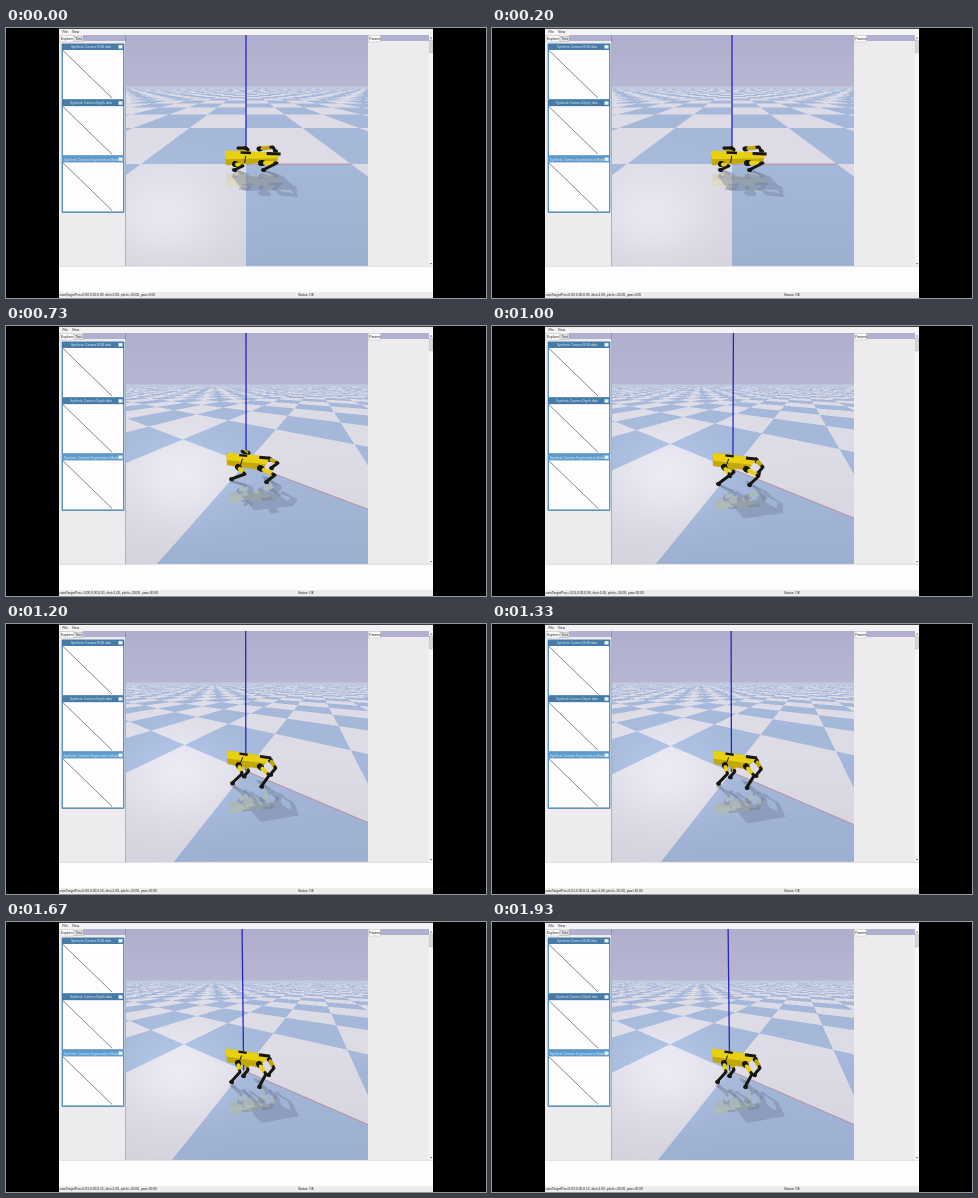
Animation, 480 px wide and 270 px high, one loop 2.07 s. Source, as an HTML page with a canvas:

```html
<!DOCTYPE html>
<html lang="en">
<head>
<meta charset="utf-8">
<title>Walking robot simulation</title>
<style>
html, body { margin: 0; width: 100%; height: 100%; overflow: hidden; background: #000; }
canvas, svg { position: absolute; left: 0; top: 0; width: 480px; height: 270px; display: block; }
text { font-family: "Liberation Sans", Arial, sans-serif; font-size: 3.3px; fill: #222; white-space: pre; }
.title { font-size: 3.2px; fill: #dce9f2; text-anchor: middle; }
</style>
</head>
<body>
<canvas id="view" width="480" height="270"></canvas>
<svg viewBox="0 0 480 270">
  <rect x="53" width="374" height="7" fill="#f3f2f5"/>
  <rect x="53" width="374" height="1" fill="#3c3c3c"/>
  <text x="56.5" y="5">File</text>
  <text x="66" y="5">View</text>

  <rect x="53" y="7" width="66.5" height="231" fill="#edebee"/>
  <rect x="77" y="7" width="42.5" height="6" fill="#b1b0cf"/>
  <rect x="54" y="7.5" width="14" height="6.5" fill="#fafafa" stroke="#bbb" stroke-width=".5"/>
  <rect x="68" y="8.2" width="9" height="5.3" fill="#e4e4e4" stroke="#aaa" stroke-width=".5"/>
  <text x="55" y="12">Explorer</text>
  <text x="69.5" y="12.2">Test</text>
  <path d="M119.5 13V238" stroke="#c0bfc8" stroke-width=".8"/>
  <g id="panes"></g>

  <rect x="362" y="7" width="65" height="231" fill="#eeebee"/>
  <rect x="374" y="7" width="49" height="6" fill="#b1b0cf"/>
  <rect x="362.5" y="7.5" width="12" height="6.5" fill="#fafafa" stroke="#bbb" stroke-width=".5"/>
  <text x="363.2" y="12">Params</text>
  <rect x="423" y="7" width="4" height="231" fill="#f6f6f6"/>
  <rect x="423.4" y="12" width="3.2" height="13" fill="#d6d6d6" stroke="#aaa" stroke-width=".4"/>
  <path d="M424 10.5L425 9L426 10.5ZM424 235L425 236.5L426 235Z" fill="#555"/>

  <rect x="53" y="238" width="374" height="26" fill="#fefcfe"/>
  <path d="M53 238.3H427" stroke="#c8c8c8" stroke-width=".6"/>
  <rect x="53" y="264" width="374" height="6" fill="#ececec"/>
  <text id="camera" x="53.6" y="268.4"></text>
  <text x="292" y="268.4">Status: OK</text>
</svg>
<script>
const LOOP = 2070, STEP = 66.77, START = 530;
const VIEW = { x: 120, y: 7, w: 242, h: 231 };
const CX = 240, CY = 136, DIST = 1;
const FX = 105, FY = 135; // the viewport is squeezed sideways
const SP = Math.sin(Math.PI / 6), CP = Math.cos(Math.PI / 6);
const ctx = document.getElementById('view').getContext('2d');

const makeLayer = (w, h) => {
  const c = document.createElement('canvas');
  c.width = w; c.height = h;
  return c;
};
const floorLayer = makeLayer(VIEW.w, VIEW.h);
const floorCtx = floorLayer.getContext('2d');
const ghostLayer = makeLayer(480, 270);
const ghostCtx = ghostLayer.getContext('2d');
const image = floorCtx.createImageData(VIEW.w, VIEW.h);

// Body: four corners. Then hip, knee and foot of far left, far right, near left, near right.
const resting = [
  220,124, 272,126, 270,133, 221,136,
  241,122, 232,120, 239,120,  253,121, 267,119, 269,123,
  229,136, 237,138, 228,142,  255,135, 271,135, 257,142];
const crouch = [
  221,123, 261,128, 259,138, 221,132,
  247,122, 235,119, 240,122,  259,125, 275,126, 268,130,
  225,133, 239,134, 224,138,  247,138, 261,139, 248,146];
const rise = [
  222,128, 262,132, 256,143, 222,138,
  242,127, 236,125, 244,131,  263,133, 272,137, 265,142,
  232,141, 239,148, 225,153,  254,142, 269,149, 260,156];
const lift = [
  222,128, 263,133, 255,143, 222,139,
  238,140, 242,146, 237,150,  264,134, 271,141, 266,147,
  232,141, 238,149, 226,158,  254,143, 267,150, 257,159];
const stand = [
  222,128, 263,134, 253,144, 223,139,
  240,140, 243,148, 238,154,  264,137, 269,146, 263,153,
  233,141, 235,150, 226,160,  254,142, 261,152, 254,165];
const shifted = stand.map((v, i) => i % 2 ? v : v - 1);

const keys = [
  { t: 530,  yaw: 23, h: 0,    dx: 0,     ground: 146, pose: crouch },
  { t: 730,  yaw: 30, h: .01,  dx: 0,     ground: 154, pose: rise },
  { t: 1000, yaw: 30, h: .06,  dx: -.01,  ground: 158, pose: lift },
  { t: 1330, yaw: 30, h: .122, dx: .01,   ground: 162, pose: stand },
  { t: 1670, yaw: 30, h: .122, dx: .028,  ground: 162, pose: shifted },
  { t: 1930, yaw: 30, h: .122, dx: .028,  ground: 162, pose: shifted }
];
const rest = { yaw: 0, h: 0, dx: 0, ground: 142, pose: resting };

const mix = (a, b, k) => a + (b - a) * k;
const clamp = v => Math.max(0, Math.min(1, v));

function stateAt(t) {
  if (t < START) return rest;
  let i = 0;
  while (i < keys.length - 2 && t >= keys[i + 1].t) i++;
  const a = keys[i], b = keys[i + 1], k = clamp((t - a.t) / (b.t - a.t));
  const s = { pose: a.pose.map((v, n) => mix(v, b.pose[n], k)) };
  for (const name of ['yaw', 'h', 'dx', 'ground']) s[name] = mix(a[name], b[name], k);
  return s;
}

function drawFloor(s) {
  const a = s.yaw * Math.PI / 180, sin = Math.sin(a), cos = Math.cos(a);
  const glowX = s.yaw ? 174 : 158, glowY = s.yaw ? 152 : 190;
  const data = image.data;
  let p = 0;
  for (let j = 0; j < VIEW.h; j++) for (let i = 0; i < VIEW.w; i++, p += 4) {
    const px = VIEW.x + i, py = VIEW.y + j;
    let white = 0, ground = 0, far = 0;
    for (let n = 0; n < 4; n++) {
      const u = (px + .25 + (n & 1) / 2 - CX) / FX;
      const v = (CY - py - .25 - (n >> 1) / 2) / FY;
      const down = SP - v * CP;
      if (down < .002) continue;
      const reach = (DIST * SP + s.h) / down;
      const fwd = reach * (CP + v * SP) - DIST * CP, right = reach * u;
      const x = right * cos - fwd * sin + s.dx, y = right * sin + fwd * cos;
      const even = (Math.floor(x) + Math.floor(y)) % 2 === 0;
      const fade = clamp((reach - 9) / 40);
      ground++;
      far += fade;
      white += mix(even ? 1 : 0, .5, fade);
    }
    const k = clamp((py - 7) / 52);
    const sky = [mix(176, 183, k), mix(174, 182, k), mix(206, 210, k)];
    const g = ground / 4, w = ground ? white / ground : 0, f = ground ? far / ground : 0;
    const r2 = ((px - glowX) / 55) ** 2 + ((py - glowY) / 45) ** 2;
    const shine = 16 * Math.exp(-r2) - 8 * clamp((py - 130) / 100);
    const tile = [mix(165, 220, w), mix(184, 219, w), mix(217, 230, w)];
    for (let c = 0; c < 3; c++)
      data[p + c] = mix(sky[c], mix(tile[c] + shine, tile[c], f), g);
    data[p + 3] = 255;
  }
  floorCtx.putImageData(image, 0, 0);
  ctx.drawImage(floorLayer, VIEW.x, VIEW.y);
}

function project(s, x, z) {
  const a = s.yaw * Math.PI / 180, wx = x - s.dx, wz = z - s.h;
  const fwd = -wx * Math.sin(a), depth = DIST + fwd * CP - wz * SP;
  return [CX + FX * wx * Math.cos(a) / depth, CY - FY * (fwd * SP + wz * CP) / depth];
}

function line(c, points, color, width) {
  c.beginPath();
  points.forEach(q => c.lineTo(q[0], q[1]));
  c.strokeStyle = color;
  c.lineWidth = width;
  c.stroke();
}

function fillShape(c, points, color) {
  c.beginPath();
  points.forEach(q => c.lineTo(q[0], q[1]));
  c.closePath();
  c.fillStyle = c.strokeStyle = color;
  c.lineWidth = 2.4;
  c.fill();
  c.stroke();
}

const between = (a, b, k) => [mix(a[0], b[0], k), mix(a[1], b[1], k)];

function drawLeg(c, [hip, knee, foot], tone, near) {
  line(c, [hip, between(hip, knee, .1)], tone.dark, near ? 6 : 5);
  line(c, [between(hip, knee, .25), between(hip, knee, .8)], near ? tone.light : tone.side, 4);
  line(c, [between(hip, knee, .85), knee, foot], tone.dark, 3);
  line(c, [foot, [foot[0] + 1.2, foot[1] + .3]], tone.dark, 3.6);
}

function drawRobot(c, pose, tone) {
  const q = [];
  for (let i = 0; i < pose.length; i += 2) q.push([pose[i], pose[i + 1]]);
  const [a, b, d, e] = q;
  const leg = n => q.slice(4 + n * 3, 7 + n * 3);
  c.lineJoin = c.lineCap = 'round';
  drawLeg(c, leg(0), tone, false);
  drawLeg(c, leg(1), tone, false);
  fillShape(c, [a, b, d, e], tone.side);
  fillShape(c, [a, b, between(b, d, .45), between(a, e, .5)], tone.light);
  c.lineCap = 'butt';
  line(c, [between(between(a, b, .38), between(e, d, .38), .3), between(e, d, .36)], tone.dark, 1);
  line(c, [between(a, b, .28), between(a, b, .48)], tone.dark, 2.4);
  line(c, [between(a, b, .78), between(a, b, 1.05)], tone.dark, 3);
  c.lineCap = 'round';
  drawLeg(c, leg(2), tone, true);
  drawLeg(c, leg(3), tone, true);
}

const paint = { light: '#e8d012', side: '#c2a808', dark: '#17170f' };
const shade = { light: '#6e7a98', side: '#6e7a98', dark: '#6e7a98' };

// Flips the robot about the ground line, leaning and scaled, as a faint layer.
function drawGhost(s, tone, lean, scale, alpha) {
  ghostCtx.setTransform(1, 0, 0, 1, 0, 0);
  ghostCtx.clearRect(0, 0, 480, 270);
  ghostCtx.setTransform(1, 0, -lean, -scale, lean * s.ground, (1 + scale) * s.ground);
  drawRobot(ghostCtx, s.pose, tone);
  ctx.globalAlpha = alpha;
  ctx.drawImage(ghostLayer, 0, 0);
  ctx.globalAlpha = 1;
}

function statusText(s) {
  const n = v => v.toFixed(2);
  return `camTargetPos=${n(s.dx)},0.00,${n(s.h)}, dist=1.00, pitch=-30.00, yaw=${n(s.yaw)}`;
}

function draw(t) {
  const s = stateAt(t);
  ctx.fillStyle = '#000';
  ctx.fillRect(0, 0, 480, 270);
  ctx.save();
  ctx.beginPath();
  ctx.rect(VIEW.x, VIEW.y, VIEW.w, VIEW.h);
  ctx.clip();
  drawFloor(s);
  drawGhost(s, paint, .1, .85, .16);
  drawGhost(s, shade, 1, 1.1, .38);
  const origin = project(s, 0, 0);
  line(ctx, [origin, project(s, 1, 0)], 'rgba(190,104,116,.75)', .8);
  line(ctx, [origin, project(s, 0, 1)], '#2626bd', 1.3);
  drawRobot(ctx, s.pose, paint);
  ctx.restore();
  document.getElementById('camera').textContent = statusText(s);
}

document.getElementById('panes').innerHTML = ['RGB data', 'Depth data', 'Segmentation Mask'].map((name, i) => {
  const y = 15.5 + i * 56.2, active = i === 2;
  return `<rect x="55.6" y="${y}" width="62.8" height="57" rx="1" fill="#5c93b8"/>
    <rect x="56" y="${y + .4}" width="62" height="6" fill="${active ? '#5a9bd0' : '#457ba6'}"/>
    <rect x="57" y="${y + 6.5}" width="60" height="49" fill="#fefcfe"/>
    <path d="M57 ${y + 7}L106 ${y + 54.5}" stroke="#555" stroke-width=".7"/>
    <rect x="112.5" y="${y + 1.6}" width="4" height="3.4" fill="#e9f3f8"/>
    <text class="title" x="85" y="${y + 4.6}">Synthetic Camera ${name}</text>`;
}).join('');

const begin = performance.now();
let shown = -1;
function tick() {
  const t = Math.max(0, performance.now() - begin) % LOOP;
  const step = Math.floor((t + 4) / STEP);
  if (step !== shown) {
    shown = step;
    draw(step * STEP);
  }
  requestAnimationFrame(tick);
}
tick();
</script>
</body>
</html>
```
